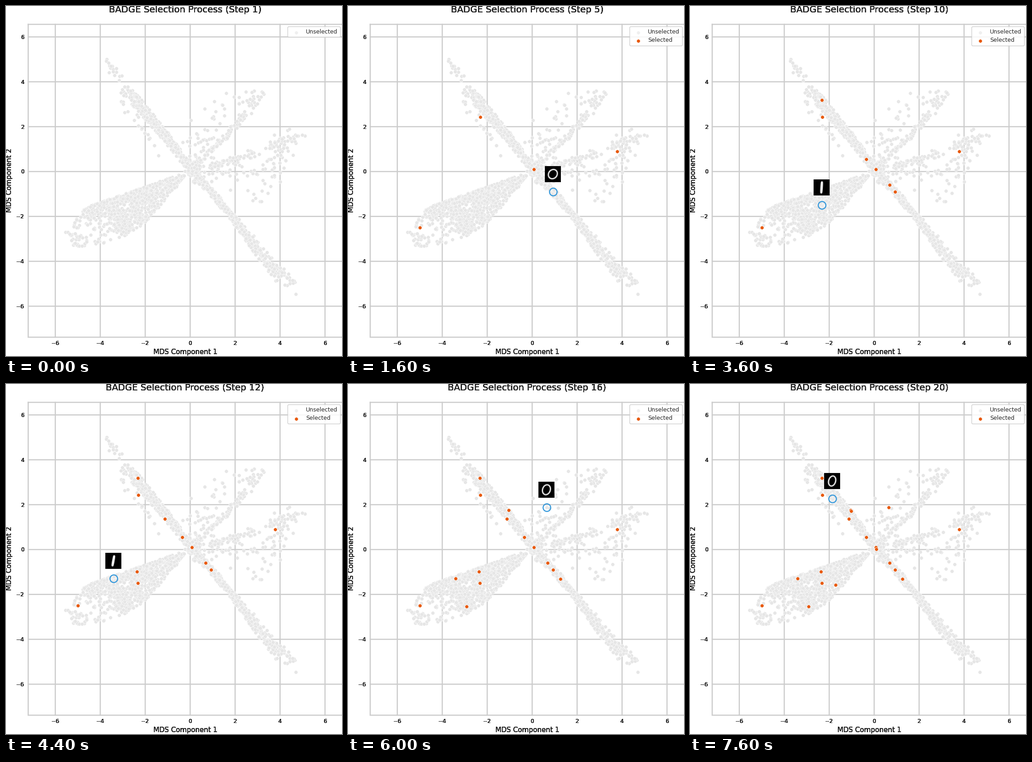
A matplotlib script that plays this animation: 734 by 763 pixels, repeating every 8 s.

```python
import numpy as np
import matplotlib.pyplot as plt
from matplotlib.animation import FuncAnimation
from matplotlib.patches import FancyBboxPatch

W, H, DPI = 734, 763, 100
PT = 72 / DPI  # points per pixel
GRID, INK, GRAY, ORANGE, BLUE = "#cccccc", "#262626", "#e6e6e6", "#e8590c", "#3498db"
LEFT, TOP, RIGHT, BOTTOM = 48, 39.5, 735, 721.5
ORIGIN = np.array([402, 358])

plt.rcParams["font.family"] = "DejaVu Sans"
rng = np.random.default_rng(5)

# Points in the order in which they are selected
PICKS = np.array([
    (405, 355), (156, 482), (587, 316), (288, 241), (447, 404), (287, 204), (435, 389),
    (285, 408), (384, 333), (287, 433), (346, 293), (234, 423), (258, 484), (463, 424),
    (350, 274), (433, 268), (317, 437), (351, 276), (406, 359), (310, 249),
])


def arm(path, half_widths, n, falloff=1.0):
    """Points strewn along a bent arm, thinning out towards its end."""
    path = np.array(path, float)
    t = rng.beta(1, falloff, n)
    knots = np.linspace(0, 1, len(path))
    base = np.column_stack([np.interp(t, knots, path[:, k]) for k in (0, 1)])
    dx, dy = path[-1] - path[0]
    normal = np.array([-dy, dx]) / np.hypot(dx, dy)
    spread = np.interp(t, np.linspace(0, 1, len(half_widths)), half_widths)
    return base + (np.clip(rng.normal(0, .55, n), -1, 1) * spread)[:, None] * normal


def lobe(r, share=1.0):
    """Points of the lobe at lower left, at the given radii, denser at its upper edge."""
    low = 19.5 + 8 * np.clip((r - 240) / 75, 0, 1)
    high = 49 - 16 * np.clip((r - 140) / 165, 0, 1) ** 1.3
    a = np.radians(low + (high - low) * share * rng.random(len(r)) ** 1.25)
    return ORIGIN + np.column_stack([-r * np.cos(a), r * np.sin(a)])


def blob(center, spread, n):
    return rng.normal(center, spread, (n, 2))


def patch(corner, opposite, n):
    return rng.uniform(corner, opposite, (n, 2))


cloud = np.vstack([
    # upper left arm with its tail and the strays beside it
    arm([(404, 357), (350, 286), (303, 230), (257, 178)], [6, 9, 10, 12], 420, 1.25),
    arm([(262, 185), (216, 115)], [12, 8], 20),
    arm([(250, 205), (292, 260), (352, 340)], [9], 20),
    # lower right arm with its tail
    arm([(404, 358), (447, 404), (500, 465), (550, 530), (600, 592)], [8, 6, 8, 11, 13], 500, 1.1),
    arm([(603, 570), (646, 642)], [14], 18),
    # lobe
    lobe(205 * np.sqrt(rng.random(700))),
    lobe(rng.uniform(195, 308, 120)),
    lobe(rng.uniform(170, 254, 85), .3),
    # upper right
    arm([ORIGIN, (460, 303), (500, 262), (545, 208)], [5, 4, 8, 13], 95),
    arm([(440, 245), (500, 205), (566, 190)], [24, 24, 8], 32),
    blob((424, 305), (20, 22), 38),
    # right
    arm([(445, 352), (500, 332), (560, 312), (650, 276)], [8, 9, 9, 10], 82),
    blob((606, 316), (13, 17), 34),
    patch((450, 325), (600, 375), 42),
    patch((484, 375), (600, 408), 9),
    patch((520, 400), (560, 450), 5),
    # centre
    blob((408, 352), (9, 10), 90),
    blob((425, 372), (10, 10), 22),
    PICKS,
])

fig = plt.figure(figsize=(W / DPI, H / DPI), dpi=DPI, facecolor="white")
ax = fig.add_axes([0, 0, 1, 1])
ax.axis("off")


def set_view():
    """Whole numbers fall on pixel centres, with y pointing down."""
    ax.set_xlim(-.5, W - .5)
    ax.set_ylim(H - .5, -.5)


def dots(points, color, z, edge_alpha=1):
    x, y = np.transpose(points)
    return ax.scatter(x, y, s=(7.8 * PT) ** 2, c=color, edgecolors=[(1, 1, 1, edge_alpha)],
                      linewidths=.8 * PT, zorder=z)


def line(xs, ys, z):
    ax.plot(xs, ys, color=GRID, lw=2.5 * PT, zorder=z, snap=False, solid_joinstyle="miter")


def label(x, y, text, px, copies=8, **style):
    """Overlaid copies give the heavier lettering of the axis text."""
    style = {"ha": "center", "va": "baseline", "color": INK, "zorder": 6, **style}
    return [ax.text(x, y, text, fontsize=px * PT, **style) for _ in range(copies)]


for v in range(-6, 7, 2):
    x, y = 401.8 + 49.1 * v, 360.4 - 48.92 * v
    line([x, x], [TOP, BOTTOM], 1)
    line([LEFT, RIGHT], [y, y], 1)
    tick = str(v).replace("-", "\u2212")
    label(x, 738.8, tick, 12.4)
    label(39.2, y + 4.5, tick, 12.4, ha="right")
line([LEFT, RIGHT, RIGHT, LEFT, LEFT], [TOP, TOP, BOTTOM, BOTTOM, TOP], 4)

label(391, 759, "MDS Component 1", 14.9)
label(11.3, 380, "MDS Component 2", 14.9, rotation=90, rotation_mode="anchor")
titles = label(391, 13.5, "", 19.75)

dots(rng.permutation(cloud), GRAY, 2, edge_alpha=.75)
selected = dots(PICKS[:1], ORANGE, 3)
ring, = ax.plot([], [], "o", ms=16.6 * PT, mfc="none", mec=BLUE, mew=2.3 * PT, zorder=5)
thumb = ax.imshow(np.zeros((28, 28)), cmap="gray", vmin=0, vmax=1, aspect="auto",
                  interpolation="bilinear", zorder=7)

legend_box = FancyBboxPatch((617.5, 47), 110, 18, boxstyle="round,pad=2.5,rounding_size=2.5",
                            fc=(1, 1, 1, .85), ec=GRID, lw=1.3 * PT, zorder=8)
ax.add_patch(legend_box)
dots([(633, 57)], "#efefef", 9)
label(654.5, 59, "Unselected", 12.4, 1, ha="left", zorder=9)
selected_key = [dots([(633, 75)], ORANGE, 9),
                *label(654.5, 77.6, "Selected", 12.4, 1, ha="left", zorder=9)]


def digit(i):
    """A 28 x 28 handwritten loop; in the lobe it closes up into a one."""
    x, y = PICKS[i]
    hand = np.random.default_rng(i)
    is_one = x < 400 and y > 400
    a = .4 if is_one else hand.uniform(5, 7.5)
    b = hand.uniform(8, 9)
    tilt = np.radians(hand.uniform(-5, 25) if is_one else hand.uniform(8, 40))
    width = hand.uniform(3.2, 4) if is_one else hand.uniform(2.3, 2.9)
    t = np.linspace(0, 2 * np.pi, 90)
    u, v = a * np.cos(t), b * np.sin(t)
    px = 14 + u * np.cos(tilt) - v * np.sin(tilt)
    py = 14 + u * np.sin(tilt) + v * np.cos(tilt)
    gy, gx = np.mgrid[:28, :28] + .5
    gap = np.hypot(gx[..., None] - px, gy[..., None] - py).min(axis=-1)
    return np.clip(width / 2 + .4 - gap, 0, 1)


def update(i):
    for t in titles:
        t.set_text(f"BADGE Selection Process (Step {i + 1})")
    for artist in (selected, ring, thumb, *selected_key):
        artist.set_visible(i > 0)
    legend_box.set_height(37 if i > 0 else 18)
    x, y = PICKS[i]
    selected.set_offsets(PICKS[:max(i, 1)])
    ring.set_data([x], [y])
    thumb.set_data(digit(i))
    thumb.set_extent((x - 17.5, x + 17.5, y - 20.5, y - 55.5))
    set_view()
    return []


anim = FuncAnimation(fig, update, frames=len(PICKS), interval=400, repeat=True, blit=False)
plt.show()
```
